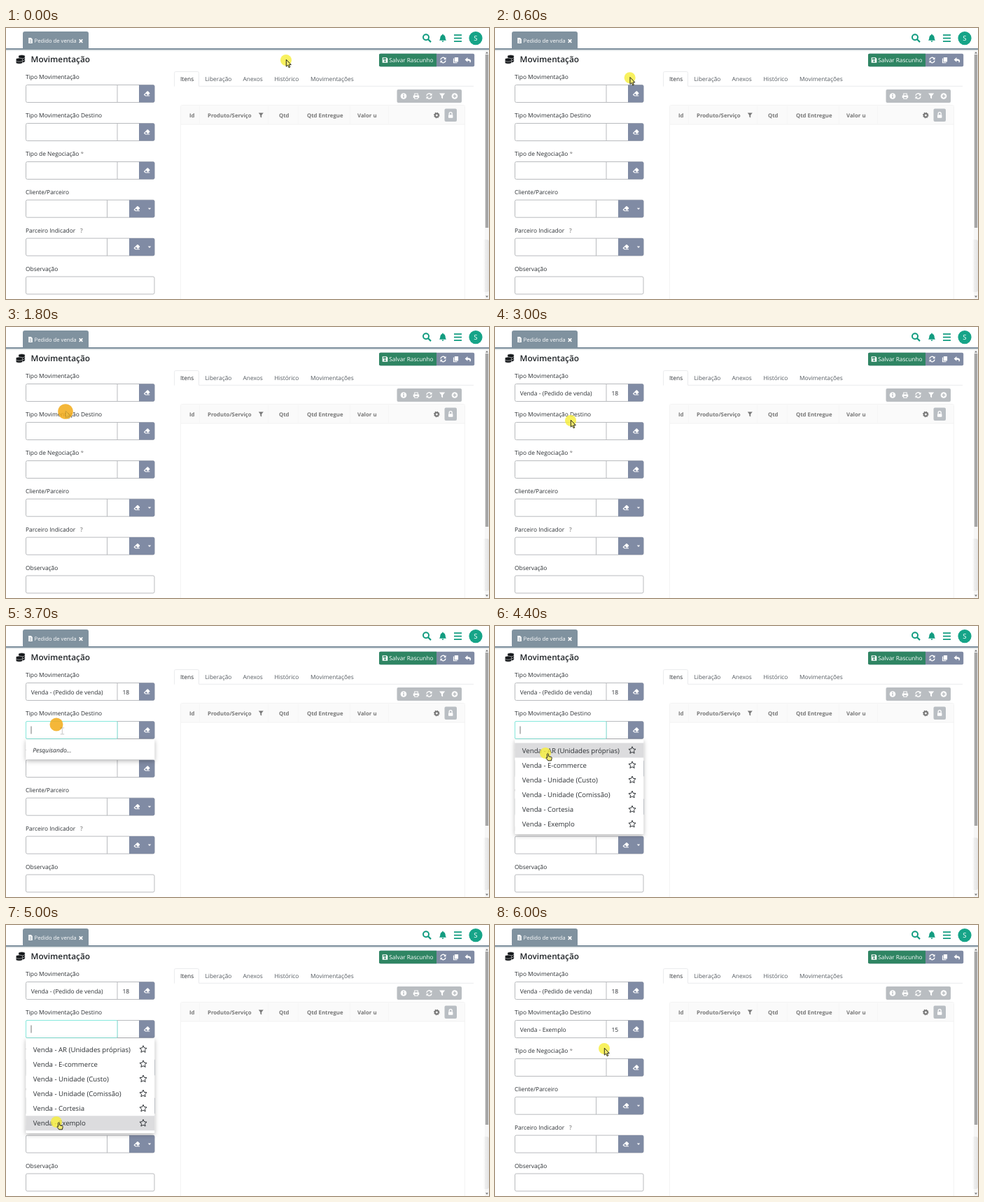
Write an HTML page that moves like this. It is 690 by 388 pixels and loops after 6.8 s.

```html
<!DOCTYPE html>
<html lang="pt">
<head>
<meta charset="utf-8">
<title>Pedido de venda</title>
<style>
html, body { margin: 0; width: 100%; height: 100%; overflow: hidden; background: #fff; }
svg { display: block; width: 690px; height: 388px; }
text { font-family: "Open Sans", "Noto Sans", sans-serif; white-space: pre; text-rendering: geometricPrecision; }
.drop { filter: drop-shadow(0 2px 3px rgba(0, 0, 0, .28)); }
</style>
</head>
<body>
<svg id="stage" viewBox="0 0 690 388" xmlns="http://www.w3.org/2000/svg"></svg>
<script>
const LOOP = 6800, STEP = 100;
const SLATE = '#808ba4', TAB = '#80929f', TEAL = '#129c80', INK = '#2b2f33', GREY = '#777';

const text = (x, y, s, size = 8.4, fill = INK, extra = '') =>
  `<text x="${x}" y="${y + .4}" font-size="${size}" fill="${fill}" ${extra}>${s}</text>`;
const rect = (x, y, w, h, fill, r = 0, extra = '') =>
  `<rect x="${x}" y="${y}" width="${w}" height="${h}" rx="${r}" fill="${fill}" ${extra}/>`;
const path = (d, fill, extra = '') => `<path d="${d}" fill="${fill}" ${extra}/>`;
const line = (d, color, w = 1, extra = '') =>
  path(d, 'none', `stroke="${color}" stroke-width="${w}" ${extra}`);
const circle = (x, y, r, fill, extra = '') =>
  `<circle cx="${x}" cy="${y}" r="${r}" fill="${fill}" ${extra}/>`;
const at = (x, y, body) => `<g transform="translate(${x} ${y})">${body}</g>`;
const group = (id, body) => `<g id="${id}">${body}</g>`;

// Icons are drawn around 0,0
const icon = {
  eraser: path('M-4.3 1.2L.3-3.4Q1-4 1.7-3.4L4-1.1Q4.5-.5 4 .1L1.3 2.6H4V3.6H-2.2L-4.3 1.8Q-4.6 1.5-4.3 1.2Z', '#fff')
    + path('M-2.9 1.4L-1.2-.2L1.2 2.2L.8 2.6H-1.8Z', SLATE),
  caret: path('M-2.2-1H2.2L0 1.3Z', '#fff'),
  refresh: line('M-3.6-.6A3.7 3.7 0 0 1 3-2.2M3.6 .6A3.7 3.7 0 0 1-3 2.2', '#fff', 1.4)
    + path('M4-4.2V-.8H.7ZM-4 4.2V.8H-.7Z', '#fff'),
  copy: rect(-1.6, -4, 5.2, 6.4, '#fff', .6) + path('M-3.6-2.4H-2.3V3.2H2V4.3H-3.6Z', '#fff'),
  undo: path('M-4.4-.6L-.6-4V-1.8Q4.4-1.8 4.2 1.6Q4 3.2 2.6 4Q3.4 .6-.6 .7V2.8Z', '#fff'),
  save: path('M-3.8-3.8H2.2L3.8-2.2V3.8H-3.8Z', '#fff') + rect(-2.6, -2.7, 4.2, 2, '#2f8563') + circle(0, 1.5, 1.2, '#2f8563'),
  filter: (c, k = 1) => path('M-4-4H4.2L1.1-.2V4L-1 2.6V-.2Z', c, `transform="scale(${k})"`),
  info: circle(0, 0, 4.3, '#fff') + rect(-.7, -.8, 1.4, 3.2, '#b7bbbf') + circle(0, -2.1, .8, '#b7bbbf'),
  plus: circle(0, 0, 4.3, '#fff') + line('M-2.4 0H2.4M0-2.4V2.4', '#b7bbbf', 1.3),
  print: path('M-2.8-4H2.8V-1H4.2V2.6H2.8V4.2H-2.8V2.6H-4.2V-1H-2.8Z', '#fff')
    + rect(-1.8, -3, 3.6, 2, '#b7bbbf') + rect(-1.8, 1.4, 3.6, 1.8, '#b7bbbf'),
  gear: circle(0, 0, 2.5, 'none', `stroke="${GREY}" stroke-width="1.9"`)
    + circle(0, 0, 3.7, 'none', `stroke="${GREY}" stroke-width="1.2" stroke-dasharray="1.45"`),
  lock: rect(-3.2, -.5, 6.4, 4.5, '#fff', .6) + line('M-2-.4V-2A2 2 0 0 1 2-2V-.4', '#fff', 1.3),
  search: circle(-1, -1.2, 4, 'none', `stroke="${TEAL}" stroke-width="2"`) + line('M2 1.8L6 5.6', TEAL, 2.2),
  bell: path('M-5 3.2Q-3.6 1.8-3.6-1.2Q-3.4-4.2-.7-4.8V-5.8H.7V-4.8Q3.4-4.2 3.6-1.2Q3.6 1.8 5 3.2ZM-1.5 4H1.5Q1.2 5.6 0 5.6Q-1.2 5.6-1.5 4Z', TEAL),
  file: path('M-2.8-4H.8L2.8-2V4H-2.8Z', '#fff') + line('M-1.4-1H1.4M-1.4 .8H1.4M-1.4 2.5H1.4', TAB, .7),
  star: (() => {
    const p = [...Array(10)].map((_, i) => {
      const r = i % 2 ? 2.5 : 5.3, a = Math.PI * (i / 5 - .5);
      return `${(r * Math.cos(a)).toFixed(2)} ${(r * Math.sin(a)).toFixed(2)}`;
    });
    return path(`M${p.join('L')}Z`, 'none', `stroke="${INK}" stroke-width="1" stroke-linejoin="round"`);
  })(),
  coins: [[2, 2], [2, -.8], [2, -3.8], [-1.6, 3.6], [-1.6, .6]].map(([x, y]) =>
    path(`M${x - 4.6} ${y - .6}A4.6 1.8 0 0 1 ${x + 4.6} ${y - .6}V${y + 1}A4.6 1.8 0 0 1 ${x - 4.6} ${y + 1}Z`,
      '#15181b', 'stroke="#fff" stroke-width=".5"')).join('')
};

function header() {
  return rect(0, 29, 690, 2.4, TAB) + rect(0, 31.4, 690, 1.2, '#dfe4e7')
    + path('M24 30V8Q24 5 27 5H115Q118 5 118 8V30Z', TAB)
    + at(35, 18, icon.file) + text(40.6, 20.8, 'Pedido de venda', 7.7, '#fff')
    + line('M104.7 16.4L109.3 21M109.3 16.4L104.7 21', '#fff', 1.7)
    + at(601, 14.5, icon.search) + at(624, 14.5, icon.bell)
    + line('M640 10.2H651M640 14.7H651M640 19.2H651', TEAL, 1.8)
    + circle(671, 14.6, 9.6, '#16a488')
    + text(671, 17.8, 'S', 9.6, '#fff', 'text-anchor="middle"')
    + at(20.5, 44.8, icon.coins)
    + text(35.6, 49, 'Movimentação', 11.8, '#202428', 'font-weight="600"')
    + rect(533, 36.8, 136.2, 18.4, SLATE, 2)
    + path('M615 36.8V55.2H535Q533 55.2 533 53.2V38.8Q533 36.8 535 36.8Z', '#2f8563')
    + at(541.5, 46, icon.save) + text(547.3, 48.8, 'Salvar Rascunho', 8.25, '#fff')
    + at(624.5, 46, icon.refresh) + at(642.5, 46, icon.copy) + at(660, 46, icon.undo);
}

function field(label, y, split, menu) {
  const left = menu ? 176 : 190;
  let out = text(28, y - 21, label)
    + rect(28.5, y - 12.5, 183.5, 25, '#fff', 2, 'stroke="#b9bbbe"');
  if (!split) return out;
  out += line(`M${split} ${y - 12.5}v25`, '#b9bbbe')
    + path(`M${left} ${y - 12.5}H210.3Q212.3 ${y - 12.5} 212.3 ${y - 10.5}V${y + 10.5}Q212.3 ${y + 12.5} 210.3 ${y + 12.5}H${left}Z`, SLATE)
    + at(menu ? 187 : 201.3, y, icon.eraser);
  return menu ? out + at(205, y, icon.caret) : out;
}

function form() {
  return field('Tipo Movimentação', 94, 159)
    + field('Tipo Movimentação Destino', 149, 159)
    + field('Tipo de Negociação <tspan fill="#888">*</tspan>', 204, 159)
    + field('Cliente/Parceiro', 258.7, 144.5, true)
    + field('Parceiro Indicador', 313.6, 144.5, true)
    + text(106, 293, '?', 8.4, '#666')
    + field('Observação', 368.5);
}

function table() {
  const tabs = [[284.5, 'Liberação'], [338.5, 'Anexos'], [383.5, 'Histórico'], [435, 'Movimentações']];
  const heads = [[262, 'Id'], [288, 'Produto/Serviço'], [390, 'Qtd'], [430, 'Qtd Entregue'], [502, 'Valor u']];
  return line('M240 83.3H240.5V64.5Q240.5 62.5 242.5 62.5H273.5Q275.5 62.5 275.5 64.5V83.3H668', '#eaebed')
    + text(249, 76, 'Itens')
    + tabs.map(([x, s]) => text(x, 76, s, 8.4, '#555b61')).join('')
    + rect(558.5, 88, 92.5, 19, '#b9bdc1', 2)
    + at(568, 97.5, icon.info) + at(586, 97.5, icon.print) + at(604.5, 97.5, icon.refresh)
    + at(623, 97.5, icon.filter('#fff')) + at(641, 97.5, icon.plus)
    + rect(249.5, 110.5, 406, 290, '#fff', 2, 'stroke="#f3f3f3"')
    + rect(250, 111, 405, 27, '#fafafa')
    + line('M250 138H655', '#f1f1f1')
    + line('M276.5 112V137M374.5 112V137M417.5 112V137M491.5 112V137M546.5 112V137', '#f6f6f6')
    + heads.map(([x, s]) => text(x, 127.8, s, 7.8, GREY, 'font-weight="700"')).join('')
    + at(364.2, 125, icon.filter(GREY, .85))
    + at(615.3, 125, icon.gear)
    + rect(626.5, 115.5, 17.5, 18.5, '#b9bec3', 2) + at(635.2, 124.7, icon.lock);
}

function scrollbar() {
  return `<defs><linearGradient id="edge"><stop offset="0" stop-color="#888" stop-opacity="0"/>
    <stop offset="1" stop-color="#888" stop-opacity=".18"/></linearGradient></defs>`
    + rect(684, 32.6, 6, 356, '#f6f6f6')
    + rect(684.8, 38, 4.4, 248, '#a6a6a6')
    + path('M685 36.4H689L687 34ZM685 383.6H689L687 386Z', '#777')
    + rect(681, 303, 9, 75, 'url(#edge)', 3);
}

const focusBox = (id, y) => group(id,
  rect(28.5, y - 12.5, 130.5, 25, '#fff', 1.5, 'stroke="#86e8dc"'));
const caret = (id, y) => group(id, line(`M36 ${y - 5.5}v11`, '#555', .8));
const row = (s, y) => text(38.8, y + 3.1, s, 9.64) + at(196, y, icon.star);
const panel = (y, h) => rect(28.3, y, 184, h, '#fff', 1, 'class="drop"');
const itemY = i => 178 + i * 21.15;
const items = ['Venda - AR (Unidades próprias)', 'Venda - E-commerce', 'Venda - Unidade (Custo)',
  'Venda - Unidade (Comissão)', 'Venda - Cortesia', 'Venda - Exemplo'];
const waiting = y => text(38.2, y + 3, 'Pesquisando...', 8.7, INK, 'font-style="italic"');
const value = (id, y, s, n) => group(id, text(35.8, y + 3.2, s, 8.48) + text(166.5, y + 3.2, n, 8.48));

const overlays = focusBox('focus1', 94) + caret('caret1', 94)
  + focusBox('focus2', 149) + caret('caret2', 149)
  + value('val1', 94, 'Venda - (Pedido de venda)', '18')
  + value('val2', 149, 'Venda - Exemplo', '15')
  + group('wait1', panel(107.5, 29) + waiting(122.5))
  + group('list1', panel(107.5, 29) + rect(28.3, 112, 184, 20.5, '#dcdcde') + row('Venda - (Pedido de venda)', 122.3))
  + group('wait2', panel(162.5, 29) + waiting(177.5))
  + group('list2', panel(162.5, 135.5) + rect(28.3, 0, 184, 21, '#dcdcde', 0, 'id="hover"')
    + items.map((s, i) => row(s, itemY(i))).join(''));

const outline = 'stroke="#2a2a1c" stroke-width="1" stroke-linejoin="round"';
const pointer = group('pointer',
  circle(0, 0, 8, '#f5ea35', 'id="halo"')
  + group('shape',
    group('arrow', path('M.3-.8V9.2L2.6 7.2L4.2 10.8L5.8 10L4.3 6.6H7.3Z', '#f3ea70', outline))
    + group('ibeam', line('M5.6 4.8H7.5L8.4 5.4L9.3 4.8H11.2M8.4 5.4V13.2M5.6 13.8H7.5L8.4 13.2L9.3 13.8H11.2', '#222', 1.3))
    + group('hand', path('M2.4 1.2Q3.6 0 4.5 1.4V4.6L8.4 5.5Q9.4 6 9.2 7.2L8.4 10.8H3.7L1.2 7.4Q.7 6.4 1.7 6.2L2.6 6.8Z', '#f3ea70', outline))));

document.getElementById('stage').innerHTML =
  rect(0, 0, 690, 388, '#fff') + header() + form() + table() + scrollbar() + overlays + pointer;

const el = {};
document.querySelectorAll('#stage [id]').forEach(n => el[n.id] = n);

// Pointer route: time, x, y
const route = [[0, 400, 46], [300, 400, 46], [800, 80, 85], [1100, 80, 85], [1200, 80, 87], [1300, 80, 87],
  [1600, 85, 121], [2700, 85, 121], [3000, 108, 134], [3100, 108, 134], [3500, 72, 141], [3900, 72, 141],
  [4300, 72, 182], [4400, 72, 182], [5000, 72, 282], [5100, 72, 282], [5300, 112, 213], [5800, 156, 177], [LOOP, 156, 177]];
const shapes = [[0, 'arrow'], [800, 'ibeam'], [1500, 'hand'], [1800, 'arrow'], [3500, 'ibeam'], [4200, 'hand'], [5200, 'arrow']];
const clicks = [800, 1700, 3500, 5100];
const visible = {
  focus1: [900, 1800], caret1: [900, 1200], wait1: [900, 1400], list1: [1400, 1800], val1: [2100, LOOP],
  focus2: [3600, 5200], caret2: [3600, 5200], wait2: [3600, 4000], list2: [4000, 5200], val2: [5400, LOOP]
};

function position(t) {
  const i = Math.max(1, route.findIndex(p => p[0] > t));
  const [t0, x0, y0] = route[i - 1], [t1, x1, y1] = route[i];
  const k = (t - t0) / (t1 - t0), e = k * k * (3 - 2 * k);
  return [x0 + (x1 - x0) * e, y0 + (y1 - y0) * e];
}

const show = (node, on) => node.style.display = on ? '' : 'none';

function draw(now) {
  const t = Math.floor((now % LOOP) / STEP) * STEP;
  for (const id in visible) show(el[id], t >= visible[id][0] && t < visible[id][1]);

  const [x, y] = position(t);
  el.pointer.setAttribute('transform', `translate(${x} ${y})`);
  const shape = shapes.filter(s => s[0] <= t).pop()[1];
  for (const s of ['arrow', 'ibeam', 'hand']) show(el[s], s === shape);

  const i = Math.round((y + 1 - itemY(0)) / 21.15);
  el.hover.setAttribute('y', itemY(Math.min(5, Math.max(0, i))) - 10.5);
  show(el.hover, y > 166);

  // A click swells the halo and washes over the pointer
  const since = clicks.map(c => t - c).find(d => d >= 0 && d < 300);
  const pressed = since !== undefined;
  el.halo.setAttribute('r', pressed ? (since === 100 ? 10.8 : 9.5) : 8);
  el.halo.setAttribute('fill', pressed ? '#f2ac1c' : '#f6ee3c');
  el.halo.setAttribute('opacity', pressed ? .87 : .82);
  el.shape.setAttribute('opacity', pressed ? .2 : 1);
}

const start = performance.now();
function tick() {
  draw(performance.now() - start);
  requestAnimationFrame(tick);
}
tick();
</script>
</body>
</html>
```
